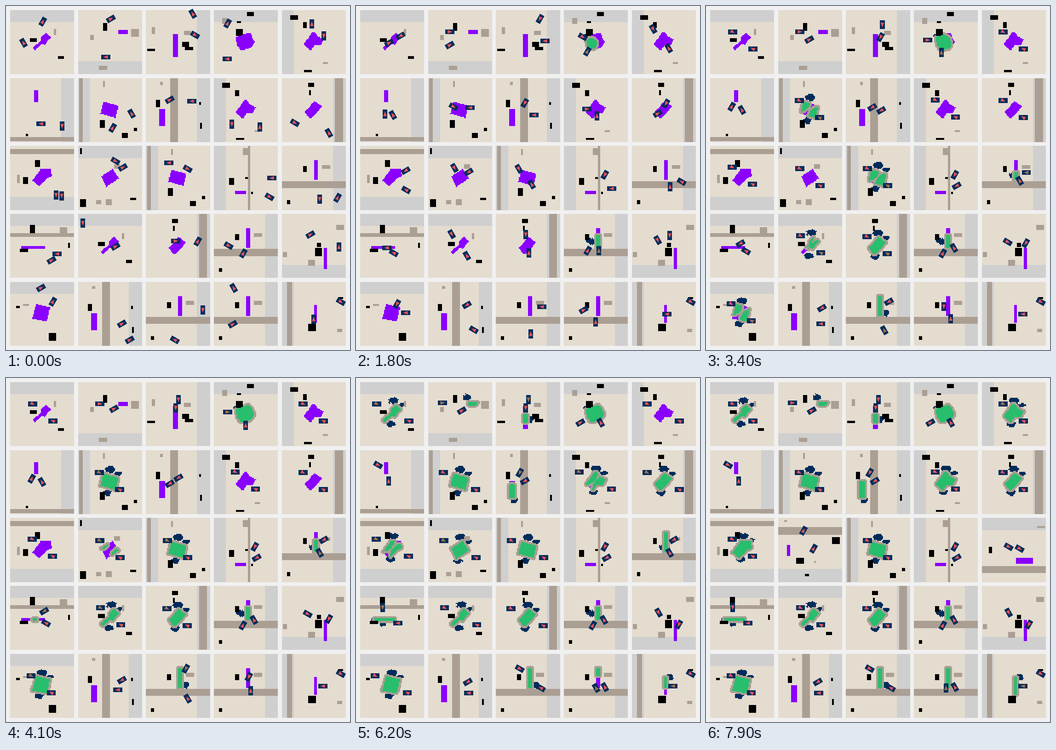
Animation, 748 px wide and 748 px high, one loop 8000 ms. Source, as a matplotlib script:

```python
import numpy as np
import matplotlib.pyplot as plt
from matplotlib.animation import FuncAnimation
from matplotlib.path import Path
from matplotlib.patches import Polygon

SIZE, CELLS, GAP = 748, 64, 4
GRID = 5 * CELLS + 6 * GAP
U = SIZE / GRID  # pixels per cell
SOIL, GREY, ROAD, BLOCK, TARGET, DUG, SPILL = range(7)
PALETTE = np.array([[228, 220, 207], [207, 207, 207], [171, 159, 148], [0, 0, 0],
                    [138, 0, 255], [39, 190, 109], [0, 43, 91]], np.uint8)
NAVY, RED, LOADED = "#002B5B", "#EA5455", "#A87048"
KEYS = (0, 1.8, 4, 6.5)   # times of a digger's key points
ARRIVE, STAGES = 3.4, 5   # arrival at the work spot; steps of a dig
PILES = ((1, -12, 5, 3.2), (-2, 11, 4.5, 3), (9, -8, 3.5, 2.2))  # around a pit

TOP, BOTTOM = (0, 0, 64, 12), (0, 51, 64, 64)
LEFT, RIGHT = (0, 0, 12, 64), (51, 0, 64, 64)

X, Y = np.meshgrid(np.arange(CELLS) + .5, np.arange(CELLS) + .5)
NOISE = np.kron(np.random.default_rng(4).random((32, 32)), np.ones((2, 2)))

fig = plt.figure(figsize=(SIZE / 100, SIZE / 100), dpi=100)
ax = fig.add_axes([0, 0, 1, 1])
ax.axis("off")
canvas = np.full((GRID, GRID, 3), 240, np.uint8)
picture = ax.imshow(canvas, extent=(0, SIZE, SIZE, 0), interpolation="nearest")
sites = []


def plan(grey, roads, blocks, *target):
    """Ground map and target mask, in cells of one tile."""
    base = np.zeros((CELLS, CELLS), int)
    for kind, rects in ((GREY, [grey]), (ROAD, roads), (BLOCK, blocks)):
        for x0, y0, x1, y1 in rects:
            base[y0:y1, x0:x1] = kind
    if len(target) == 1:
        x0, y0, x1, y1 = target[0]
        target = (x0, y0), (x1, y0), (x1, y1), (x0, y1)
    inside = Path(target).contains_points(np.c_[X.ravel(), Y.ravel()])
    return base, inside.reshape(X.shape)


def ring(mask):
    """Two cells of rim with cut corners."""
    p = np.pad(mask, 2)
    out = mask.copy()
    for dy in range(-2, 3):
        for dx in range(-2, 3):
            if abs(dx) + abs(dy) < 4:
                out |= p[2 + dy:2 + dy + CELLS, 2 + dx:2 + dx + CELLS]
    return out


def stepped(u, n):
    n = max(1, round(n))
    return np.floor(np.clip(u, 0, 1) * n + .5) / n


class Digger:
    """Drives through key points, facing the target; may end at a work spot."""

    def __init__(self, points, centre, side, dig):
        (x, y, hour), *rest = points
        self.path = [np.array(p, float) for p in [(x, y), *rest]]
        self.times = list(KEYS[:len(self.path)])
        self.side, self.centre, self.dig = side, centre, dig
        self.works = dig is not None and len(dig) == 2
        if self.works:
            self.path.append(centre + (22 * side, 18.5 * side - 1.5))
            self.times.append(ARRIVE)
        self.hours = [hour] + [self.bearing(p) for p in self.path[1:]]
        self.body = ax.add_patch(Polygon([(0, 0)] * 4, fc=NAVY, lw=0, zorder=3))
        self.cabin = ax.add_patch(Polygon([(0, 0)] * 3, lw=0, zorder=4))

    def bearing(self, p):
        dx, dy = self.centre - p
        return round(np.arctan2(dx, -dy) * 6 / np.pi)

    def pose(self, t):
        i = max(k for k, when in enumerate(self.times) if when <= t + 1e-6)
        if i == len(self.path) - 1:
            p, hour = self.path[i], self.hours[i]
            if not self.works:
                return p, hour, hour
            back = 1 - int(t / 2.2) % 2  # shuffle to and fro while digging
            return p + (13 * self.side * back, 0), 3 * self.side, hour
        u = (t - self.times[i]) / (self.times[i + 1] - self.times[i])
        move = self.path[i + 1] - self.path[i]
        turn = (self.hours[i + 1] - self.hours[i] + 6) % 12 - 6
        hour = self.hours[i] + turn * stepped(u, abs(turn))
        return self.path[i] + move * stepped(u, np.hypot(*move) / 12), hour, hour

    def draw(self, t, on):
        pos, head, cab = self.pose(t)

        def place(points, hour):
            a = hour * np.pi / 6
            f, r = np.array([np.sin(a), -np.cos(a)]), np.array([np.cos(a), np.sin(a)])
            return [pos + u * f + v * r for u, v in points]

        busy = self.dig is not None and self.dig[0] <= t < self.dig[1] + 1
        loaded = busy and (int(t / .8) + (self.side > 0)) % 2
        self.body.set_xy(place([(9.8, -5.4), (9.8, 5.4), (-9.8, 5.4), (-9.8, -5.4)], head))
        self.cabin.set_xy(place([(5.5, 0), (-4.5, 3.9), (-4.5, -3.9)], cab))
        self.cabin.set_facecolor(LOADED if loaded else RED)
        self.body.set_visible(on)
        self.cabin.set_visible(on)


class Site:
    """dig: start, end[, final share, origin x, y]; points in stage pixels."""

    def __init__(self, row, col, ground, a, b, dig=None, heap=None, span=(0, 9)):
        self.base, self.target = ground
        self.dig, self.span = dig, span
        self.corner = np.array([col, row]) * (CELLS + GAP) + GAP
        mid = np.array([X[self.target].mean(), Y[self.target].mean()])
        centre = (mid + self.corner) * U
        self.crew = [Digger(p, centre, s, dig) for p, s in ((a, -1), (b, 1))]
        if dig:
            self.share = 1 if len(dig) == 2 else dig[2]
            origins = [d.path[-1] for d in self.crew] if len(dig) == 2 else [dig[3:]]
            self.rank_cells(origins)
            self.piles = [(mid[0] + x, mid[1] + y, rx, ry) for x, y, rx, ry in PILES]
            if heap:
                self.piles = [(*self.local(heap), 3.6, 3.4)]
        sites.append(self)

    def local(self, p):
        return np.array(p) / U - self.corner

    def rank_cells(self, origins):
        """Cells nearest to a digger go first."""
        far = np.min([np.hypot(X - x, Y - y) for x, y in map(self.local, origins)], axis=0)
        order = np.where(self.target, far, np.inf).ravel().argsort().argsort()
        self.rank = order.reshape(X.shape) / self.target.sum()

    def paint(self, t):
        img = self.base.copy()
        img[self.target] = TARGET
        if self.dig and t >= self.dig[0]:
            u = (t - self.dig[0]) / (self.dig[1] - self.dig[0])
            done = min(1, (int(u * STAGES) + 1) / STAGES)
            for k, (x, y, rx, ry) in enumerate(self.piles):
                if done > .3 + .2 * k:
                    d = ((X - x) / rx) ** 2 + ((Y - y) / ry) ** 2
                    img[(d < .6 + .8 * NOISE) & (img == SOIL)] = SPILL
            dug = self.target & (self.rank < done * self.share)
            img[ring(dug) & (img != BLOCK)] = ROAD
            img[dug] = DUG
        x, y = self.corner
        canvas[y:y + CELLS, x:x + CELLS] = PALETTE[img]


def update(i):
    t = i / 10
    for s in sites:
        on = s.span[0] <= t < s.span[1]
        if on:
            s.paint(t + 1e-6)
        for d in s.crew:
            d.draw(t, on)
    picture.set_data(canvas)
    return []


# Grounds used by several tiles
spoon = plan(TOP, [(44, 19, 46, 25)], [(20, 28, 27, 32), (48, 46, 54, 49)],
             (22.5, 38), (25, 40.5), (31.5, 33.5), (34.5, 35), (41, 27), (36.5, 22.5), (30.5, 28), (31, 30.5))
fish = plan(LEFT, [(41, 52, 46, 54)], [(8, 5, 16, 10), (21, 12, 25, 18), (22, 60, 30, 62)],
            (22, 34), (30, 22.5), (32.5, 21.5), (36, 26.5), (41.5, 29.5), (39, 35), (33, 34.5), (29.5, 39.5), (27.5, 39.5))
slab = plan(LEFT, [(1, 0, 5, 64), (25, 3, 27, 9)], [(22, 42, 27, 50), (56, 50, 59, 53), (44, 55, 50, 60)],
            (25.5, 23.5), (40.5, 28), (37.5, 40), (22.5, 35.5))
avenue = plan(RIGHT, [(24, 0, 32, 64), (14, 4, 17, 7)],
              [(10, 22, 14, 29), (53, 24, 55, 27), (54, 45, 56, 51)], (13, 31, 19, 48))
brick = plan(RIGHT, [(53, 0, 61, 64)], [(26, 5, 32, 9), (27, 12, 29, 17)],
             (23, 34), (32.5, 23), (40, 28.5), (30, 40), (27, 40))
cross = plan(RIGHT, [(0, 35, 64, 42), (40, 19, 48, 23)], [(21, 20, 25, 26), (5, 54, 8, 58)], (32, 14, 36, 34))

# Each digger: start with clock heading, then later key points
Site(0, 0, spoon, [(80, 34, 1), (97, 65)], [(38, 80, 11), (72, 80)], (4.2, 5.8))
Site(0, 1, plan(BOTTOM, [(21, 56, 29, 60), (12, 25, 16, 30), (53, 19, 61, 27)], [(25, 13, 29, 21)], (40, 20, 50, 24)),
     [(228, 28, 2), (204, 56), (204, 56), (188, 54)], [(217, 111, 9), (204, 85), (235, 67), (230, 71)],
     (5, 5.8, .85, 252, 48), (241, 42))
Site(0, 2, plan(RIGHT, [(6, 17, 9, 24), (38, 21, 45, 25)], [(1, 39, 9, 41), (36, 32, 43, 37), (39, 37, 47, 40)],
                (27, 24, 32, 47)),
     [(406, 17, 11), (400, 28), (375, 47)], [(411, 63, 4), (411, 76), (369, 65)], (5, 6, .35, 368, 88), (378, 90))
Site(0, 3, plan(TOP, [(8, 8, 13, 14)], [(33, 2, 40, 6), (23, 11, 27, 13), (22, 19, 29, 26)],
                (22, 27.5), (32, 23.5), (36.5, 22.5), (39, 30), (41, 32), (37, 38), (27, 40.5), (23, 35.5)),
     [(482, 38, 1), (493, 67), (482, 74), (488, 97)], [(481, 115, 9), (503, 99), (521, 103), (532, 97)],
     (1.2, 4.2, .97, 512, 82), (503, 66))
Site(0, 4, fish, [(665, 39, 0), (646, 50)], [(691, 65, 6), (680, 92)], (6.9, 7.5))

Site(1, 0, plan(RIGHT, [(0, 59, 64, 63)], [(16, 56, 18, 58)], (24, 12, 28, 24)),
     [(76, 256, 9), (63, 235), (56, 219), (48, 189)], [(122, 261, 6), (80, 237), (78, 226), (71, 224)])
Site(1, 1, slab, [(273, 234, 11), (248, 221)], [(232, 265, 1), (212, 219)], (2.7, 4.3))
Site(1, 2, avenue, [(356, 204, 2), (367, 211), (356, 230), (356, 206)],
     [(404, 207, 9), (387, 237), (375, 217), (367, 224)], (5, 6.8, 1, 340, 252), (344, 265))
Site(1, 3, fish, [(552, 263, 0), (524, 239)], [(491, 257, 6), (502, 224)], (5.2, 6.8))
Site(1, 4, brick, [(628, 254, 4), (674, 212)], [(702, 276, 11), (656, 234)], (4.2, 5.6))

Site(2, 0, plan(BOTTOM, [(0, 3, 64, 8), (7, 29, 10, 37)], [(25, 14, 30, 21), (13, 31, 18, 38)],
                (22.5, 34.5), (30.5, 23.5), (40.5, 23), (42, 30), (35.5, 33.5), (29, 40)),
     [(121, 413, 6), (109, 400)], [(109, 411, 6), (108, 358)], (5.4, 6.8))
Site(2, 1, plan(TOP, [(36, 18, 42, 23), (18, 54, 23, 58), (28, 53, 34, 59)],
                [(2, 2, 4, 8), (2, 53, 8, 61), (52, 52, 58, 54)], (23, 30.5), (34.5, 23), (41, 32.5), (28.5, 40.5)),
     [(238, 337, 4), (214, 352)], [(254, 351, 2), (245, 361)], (3.9, 5.3), span=(0, 7))
Site(2, 1, plan(BOTTOM, [(0, 9, 64, 17), (6, 2, 9, 4), (36, 43, 38, 45)],
                [(54, 19, 62, 26), (18, 40, 26, 46), (27, 56, 31, 58)], (9, 27, 12, 38)),
     [(212, 332, 1)], [(234, 371, 1)], span=(7, 9))
Site(2, 2, slab, [(354, 341, 9), (354, 354)], [(395, 354, 4), (382, 388)], (2.4, 3.8))
Site(2, 3, plan(LEFT, [(34, 0, 36, 64), (29, 2, 35, 9)], [(15, 32, 20, 39), (31, 31, 34, 33), (37, 46, 39, 48)],
                (21, 45, 32, 48)),
     [(578, 374, 9), (541, 367)], [(573, 415, 4), (556, 397), (545, 391)])
Site(2, 4, cross, [(682, 420, 6), (683, 393), (682, 380)], [(721, 417, 1), (708, 382), (691, 352)],
     (2.8, 5.2, 1, 674, 370), (667, 369), span=(0, 7))
Site(2, 4, plan(TOP, [(0, 48, 64, 55), (55, 8, 63, 10)], [(7, 29, 10, 35)], (34, 40, 51, 46)),
     [(658, 367, 4)], [(682, 371, 4)], span=(7, 9))

Site(3, 0, plan(TOP, [(0, 19, 64, 23), (50, 13, 57, 19)], [(20, 11, 25, 19), (10, 35, 18, 38), (58, 29, 60, 34)],
                (11, 32, 35, 35)),
     [(111, 539, 9), (67, 526), (83, 507), (58, 499)], [(99, 553, 2), (82, 537), (87, 533), (91, 533)],
     (3.6, 6.6, .85, 63, 525), (58, 533))
Site(3, 1, spoon, [(167, 472, 6), (208, 496)], [(238, 523, 2), (241, 543)], (2.6, 4.1))
Site(3, 2, brick, [(369, 511, 3), (369, 497)], [(417, 512, 1), (376, 537)], (2.2, 3.2))
Site(3, 3, cross, [(484, 521, 4), (504, 532), (515, 538)], [(516, 538, 1), (528, 532), (539, 526)],
     (1.3, 1.8, .65, 526, 514), (510, 512))
Site(3, 4, plan(BOTTOM, [(54, 11, 62, 16), (1, 38, 5, 43), (26, 46, 33, 52)], [(35, 29, 39, 33), (33, 34, 40, 42)],
                (42, 34, 45, 55)),
     [(662, 497, 2), (656, 509), (656, 513), (658, 510)], [(724, 524, 0), (682, 499), (702, 524), (702, 536)])

Site(4, 0, plan(TOP, [(13, 22, 19, 24)], [(6, 24, 10, 26), (39, 51, 46, 59)],
                (26.5, 22), (40, 25.5), (37, 39.5), (22, 36.5)),
     [(76, 613, 2), (89, 648)], [(102, 643, 1), (108, 667)], (2.6, 4.4))
Site(4, 1, avenue, [(252, 691, 2), (241, 650), (252, 657), (243, 661)],
     [(269, 726, 2), (256, 704), (243, 678), (245, 685)])
Site(4, 2, cross, [(428, 661, 6), (404, 654), (391, 632), (356, 632)],
     [(367, 726, 10), (380, 713), (395, 697), (402, 674)], (2.4, 3.2, 1, 378, 640), (390, 668))
Site(4, 3, cross, [(495, 613, 11), (495, 661), (528, 650), (522, 674)],
     [(493, 692, 2), (521, 687), (532, 680), (541, 672)], (5.5, 8.5, 1, 526, 640), (526, 638))
Site(4, 4, plan(LEFT, [(5, 0, 10, 64), (55, 47, 60, 50)], [(26, 42, 34, 49), (56, 15, 61, 17)], (32, 23, 35, 41)),
     [(669, 681, 0), (676, 670), (689, 670)], [(728, 643, 4)], (5.3, 7, 1, 673, 655), (683, 650))

ax.set_xlim(0, SIZE)
ax.set_ylim(SIZE, 0)
anim = FuncAnimation(fig, update, frames=80, interval=100, repeat=True, repeat_delay=0)
plt.show()
```
